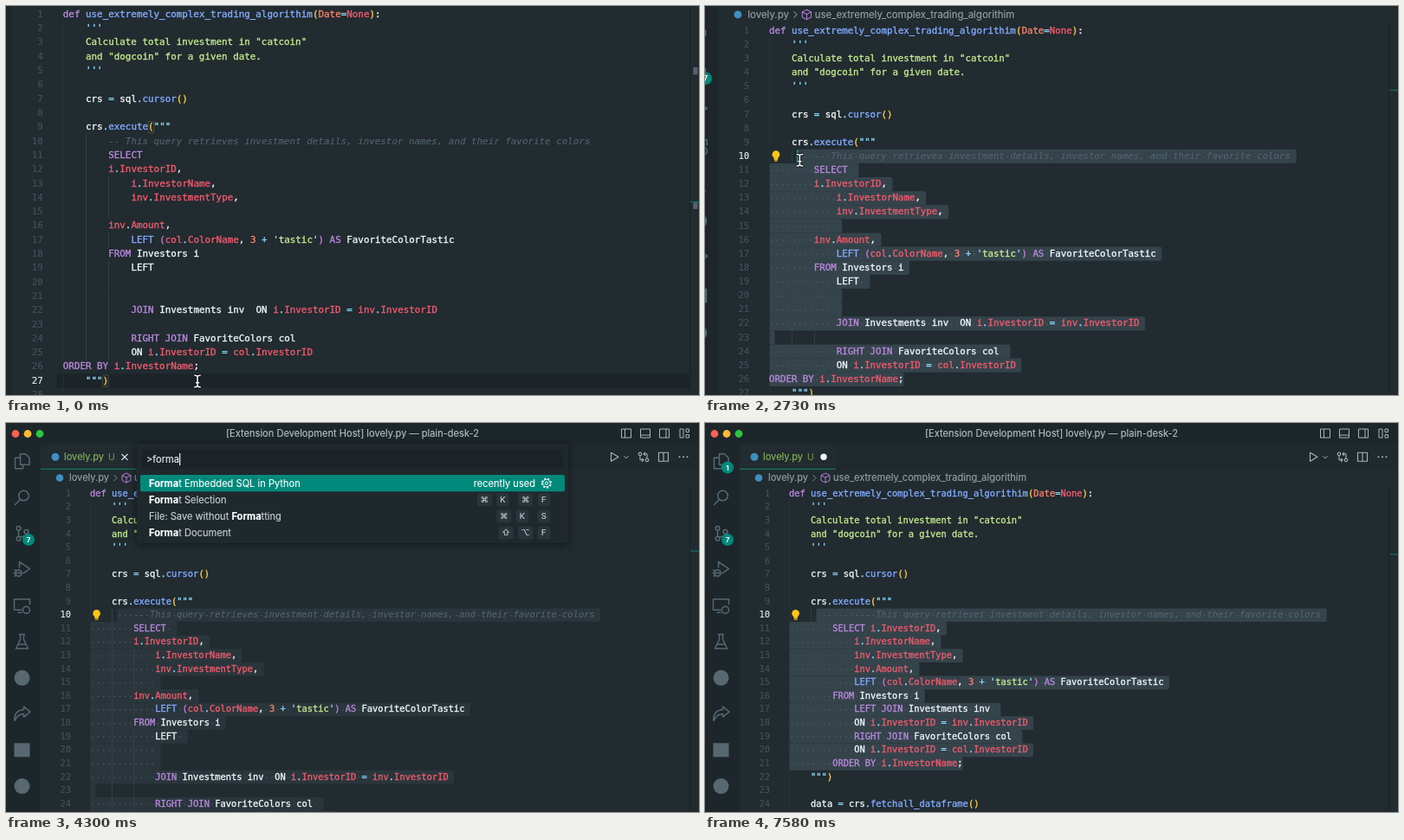
Write an HTML page with a canvas that moves like this. It is 800 by 450 pixels and loops after 7.61 s.

```html
<!DOCTYPE html>
<html lang="en">
<head>
<meta charset="utf-8">
<title>Formatting embedded SQL</title>
<style>
html, body { margin: 0; width: 100%; height: 100%; overflow: hidden; background: #212b30; }
canvas { display: block; width: 800px; height: 450px; }
</style>
</head>
<body>
<canvas id="stage" width="800" height="450"></canvas>
<script>
const ctx = document.getElementById('stage').getContext('2d');
const LOOP = 7610;
const X0 = 97, Y1 = 81.7, CW = 6.27, LH = 15.61;
const MONO = '10.415px "DejaVu Sans Mono", monospace';
const UI = 'Inter, "DejaVu Sans", sans-serif', UI_SIZE = 11.1;
const BG = '#212b30', DARK = '#1d262b', TEAL = '#00897b', ICON = '#586870';
const CLICK = 420, OPEN = 2780, HIDE = 3560, CLOSE = 6730, FORMAT = 6800;
const QUERY = 'format embedded sql';

// ---- code ----
const head = `def use_extremely_complex_trading_algorithim(Date=None):
    '''
    Calculate total investment in "catcoin"
    and "dogcoin" for a given date.
    '''

    crs = sql.cursor()

    crs.execute("""`.split('\n');
const pad = (n, s = '') => ' '.repeat(n) + s;
const comment = '-- This query retrieves investment details, investor names, and their favorite colors';
const left = "LEFT (col.ColorName, 3 + 'tastic') AS FavoriteColorTastic";
const tail = [pad(4, '""")'), '', pad(4, 'data = crs.fetchall_dataframe()')];
const before = [...head,
  pad(8, comment), pad(8, 'SELECT '), pad(8, 'i.InvestorID,'),
  pad(12, 'i.InvestorName,'), pad(12, 'inv.InvestmentType,'), pad(12),
  pad(8, 'inv.Amount,'), pad(12, left), pad(8, 'FROM Investors i'),
  pad(12, 'LEFT '), pad(12), pad(12),
  pad(12, 'JOIN Investments inv  ON i.InvestorID = inv.InvestorID'), '',
  pad(12, 'RIGHT JOIN FavoriteColors col '), pad(12, 'ON i.InvestorID = col.InvestorID'),
  'ORDER BY i.InvestorName;', ...tail];
const after = [...head,
  pad(13, comment), pad(8, 'SELECT i.InvestorID,'),
  pad(12, 'i.InvestorName,'), pad(12, 'inv.InvestmentType,'), pad(12, 'inv.Amount,'),
  pad(12, left), pad(8, 'FROM Investors i'),
  pad(12, 'LEFT JOIN Investments inv '), pad(12, 'ON i.InvestorID = inv.InvestorID'),
  pad(12, 'RIGHT JOIN FavoriteColors col '), pad(12, 'ON i.InvestorID = col.InvestorID'),
  pad(8, 'ORDER BY i.InvestorName;'), ...tail];

const COMMENT = '#53656e';
const rules = [
  [/^ {4}(Calc|and ).*/y, '#c3e88d'],
  [/ +/y, null],
  [/--.*/y, COMMENT],
  [/'+|"+|[.=+]/y, '#89ddff'],
  [/tastic/y, '#c3e88d'],
  [/LEFT(?= \()|(?!def)\w+(?=\()/y, '#82aaff'],
  [/(def|SELECT|AS|FROM|(LEFT |RIGHT )?JOIN|ORDER BY)\b/y, '#b888dc'],
  [/(i|inv|col)(?=\.)|(?<=\.)\w+|None/y, '#f05a6c'],
  [/Date|\d/y, '#f7806c'],
  [/(?<=LEFT )\(|(?<=')\)/y, '#c47ad6'],
  [/[()]/y, '#ffcb3d'],
  [/\w+|./y, '#eef6f7']
];
function tokenize(line) {
  const out = [];
  for (let i = 0; i < line.length;) {
    for (const [re, color] of rules) {
      re.lastIndex = i;
      const m = re.exec(line);
      if (!m) continue;
      if (color) out.push({ col: i, text: m[0], color });
      i += m[0].length;
      break;
    }
  }
  return out;
}
const docs = [before, after].map(lines => ({ lines, tokens: lines.map(tokenize) }));

// ---- commands: label | chords ----
const commands = `Zub: Toggle Zub Mode
Format Embedded SQL in Python
Developer: Toggle Developer Tools|⌥ ⌘ I
Terminal: Create New Terminal (In Active Workspace)
Terminal: Kill All Terminals
Developer: Open Webview Developer Tools
Developer: Reload Window|⌘ R
References: Find All Implementations
Preferences: Open Keyboard Shortcuts|⌘ K,⌘ S
Go to Next Problem (Error, Warning, Info)|⌥ F8
Extensions: Enable All Extensions
Preferences: Color Theme|⌘ K,⌘ T
Extensions: Disable All Installed Extensions
Format Selection|⌘ K,⌘ F
Collapse Folders in Explorer
Help: Privacy Statement
File: Reveal in Drawer|⌥ ⌘ R
File: Save without Formatting|⌘ K,S
Unfold All|⌘ K,⌘ J
Help: Keyboard Shortcuts Reference|⌘ K,⌘ R
ClauseShift: Compare Text with Previous Selection
ClauseShift: Select Text for Compare
Search: Find in Files|⇧ ⌘ F
Preferences: Open User Settings (JSON)
Go to References|⇧ F12
Format Document|⇧ ⌥ F
Preferences: Open User Settings`.split('\n').map(row => {
  const [label, keys = ''] = row.split('|');
  return { label, chords: keys ? keys.split(',').map(c => c.split(' ')) : [] };
});

// ---- helpers ----
const clamp = (v, a, b) => Math.min(b, Math.max(a, v));
const ease = u => (u = clamp(u, 0, 1), u * u * (3 - 2 * u));
const lineY = n => Y1 + (n - 1) * LH;
const colX = c => X0 + c * CW;

function box(x, y, w, h, fill, r = 0) {
  ctx.fillStyle = fill;
  ctx.beginPath();
  ctx.roundRect(x, y, w, h, r);
  ctx.fill();
}
function dot(x, y, r, fill) {
  ctx.fillStyle = fill;
  ctx.beginPath();
  ctx.arc(x, y, r, 0, 7);
  ctx.fill();
}
// A hairline stroke gives the glyphs a slightly heavier stem.
function text(s, x, y, color, font, align = 'left', stem = 0.15) {
  ctx.font = font;
  ctx.fillStyle = ctx.strokeStyle = color;
  ctx.lineWidth = stem;
  ctx.textAlign = align;
  ctx.fillText(s, x, y + 0.3);
  ctx.strokeText(s, x, y + 0.3);
}
const label = (s, x, y, color, align, size = UI_SIZE, weight = 400) =>
  text(s, x, y + 0.3, color, `${weight} ${size}px ${UI}`, align);
function icon(d, x, y, color = ICON, width = 1.3) {
  ctx.save();
  ctx.translate(x, y);
  ctx.strokeStyle = color;
  ctx.lineWidth = width;
  ctx.stroke(new Path2D(d));
  ctx.restore();
}
const ring = (x, y, r) => `M${x - r} ${y}a${r} ${r} 0 1 0 ${2 * r} 0a${r} ${r} 0 1 0 ${-2 * r} 0`;

// ---- timeline ----
const path = [[0, 245.6, 488], [150, 245.6, 488], [400, 249, 471], [600, 250, 456],
  [850, 250.4, 453.4], [1900, 131.2, 226.5]];
function mouse(t) {
  let i = 1;
  while (i < path.length - 1 && t > path[i][0]) i++;
  const [t0, x0, y0] = path[i - 1], [t1, x1, y1] = path[i];
  const u = ease((t - t0) / (t1 - t0));
  return { x: x0 + (x1 - x0) * u, y: y0 + (y1 - y0) * u };
}
function caretAt(t) {
  const m = mouse(Math.max(t - 40, 400));
  const ln = clamp(Math.round((m.y - Y1) / LH) + 1, 10, 26);
  return { ln, col: clamp(Math.round((m.x - X0) / CW), 0, before[ln - 1].length) };
}
// The caret glides: its place is the mean of its recent targets.
function glide(t) {
  let x = 0, y = 0;
  const n = 28;
  for (let i = 0; i < n; i++) {
    const c = caretAt(t - i * 5);
    x += colX(c.col) / n;
    y += lineY(c.ln) / n;
  }
  return { x, y };
}
const keyTime = k => k < 1 ? 3580 : k < 13 ? 3810 + (k - 1) * 130 : 5350 + (k - 13) * 108;

// ---- editor ----
function selection(lines, a, b, focused) {
  const fill = focused ? '#35434b' : '#2a363c';
  for (let n = a.ln; n <= b.ln; n++) {
    const s = lines[n - 1];
    const from = n === a.ln ? a.col : 0, to = n === b.ln ? b.col : s.length;
    const w = (to - from + (n === b.ln ? 0 : 1)) * CW;
    if (w <= 0) continue;
    box(colX(from), lineY(n) - LH / 2, w, LH + 0.1, fill, 2);
    for (let c = from; c < to; c++) {
      if (s[c] === ' ') box(colX(c + 0.5) - 0.6, lineY(n) - 0.1, 1.2, 1.2, '#52636b');
    }
  }
}
function bulb(y) {
  const x = 104.6;
  dot(x, y - 2, 4.3, '#ffc414');
  box(x - 2.2, y + 1, 4.4, 3, '#ffc414');
  box(x - 2, y + 4.3, 4, 1.6, '#c99a14', 0.6);
}
function editor(t) {
  const formatted = t >= FORMAT;
  const { lines, tokens } = docs[+formatted];
  const picking = t < CLICK;
  const palette = t >= OPEN && t < CLOSE;
  const caret = caretAt(t);
  const active = picking ? 27 : caret.ln;

  if (picking) {
    box(90, lineY(27) - LH / 2, 700, LH, '#1c2429');
    for (const [n, c] of [[9, 15], [27, 7]]) {
      ctx.strokeStyle = '#4b5546';
      ctx.lineWidth = 0.8;
      ctx.strokeRect(colX(c), lineY(n) - 6.5, CW, 13);
    }
  } else {
    selection(lines, caret, formatted ? { ln: 21, col: 32 } : { ln: 26, col: 24 }, !palette);
  }

  lines.forEach((s, i) => {
    const y = lineY(i + 1);
    const indent = (s || lines[i + 1]).search(/\S|$/);
    for (let c = 0; c < Math.min(indent, 12); c += 4) {
      box(colX(c), y - LH / 2, 0.8, LH, c ? '#38454c' : '#2a363c');
    }
    text(i + 1, 75, y, i + 1 === active ? '#e4ebed' : '#43525a', MONO, 'right');
    for (const k of tokens[i]) {
      const italic = k.color === COMMENT;
      text(k.text, colX(k.col), y, k.color, (italic ? 'italic ' : '') + MONO, 'left', italic ? 0.1 : 0.35);
    }
  });

  // overview ruler
  box(789.5, 72, 1, 440, '#1a2227');
  if (picking) {
    box(793.5, 140.2, 5, 8, '#56626a');
    box(793.5, 289.2, 5, 8, '#56626a');
  }
  box(790, 73.5 + (active - 1) * (formatted ? 8.7 : 8.3) - 0.7, 10, 1.4, '#17635f');

  if (t > 750 && t < 1250) bulb(lineY(25));
  if (t > 2150) bulb(lineY(10));
  if (!picking && !palette && (t < OPEN || t - CLOSE < 500)) {
    const c = glide(t);
    box(c.x - 0.6, c.y - 7, 1.5, 14, '#12a594');
  }
}

// ---- window frame ----
const bar = [
  'M-2-8.5h6l4.5 4.5v8h-10.500zM-2-4h-6v12.500h9v-4',
  ring(2, -2, 5.8) + 'M-2 2.500L-8.500 9',
  ring(-4, -6, 2.4) + ring(-4, 6, 2.4) + ring(5, -2, 2.4) + 'M-4-3.500V3.500M5 .5c0 3-4 3.500-8 3.500',
  'M-3-2V-9L9-1L1 4.500' + ring(-4, 4, 3.6) + 'M-10 4h3M-9 0l2 1.500M-9 8l2-1.500M-7.500 4h7',
  'M9-1V-7.500H-9V5H0M-5 8H0' + ring(5, 5, 4),
  'M-3.500-8.500h7M-2-8.500v6l-5 10.500h14l-5-10.500v-6M-4.500 3h9',
  null,
  'M2-8.500l7.500 6l-7.500 6v-3.500q-7 0-10.500 8q-1-12 10.500-13z',
  null,
  null
];
function badge(n, y) {
  dot(26, y, 7, TEAL);
  label(n, 26, y, '#fff', 'center', 8, 600);
}
function frame(t) {
  const dirty = t >= FORMAT;
  box(0, 0, 800, 25, DARK);
  box(0, 25, 40, 490, DARK);
  box(40, 25, 760, 28, '#1f292e');
  ['#ff5f57', '#febc2e', '#28c840'].forEach((c, i) => dot(11 + 14 * i, 12.5, 4.4, c));
  label('[Extension Development Host] lovely.py — plain-desk-2', 400, 12.5, '#b4bec2', 'center');

  // layout buttons
  const light = '#aab5ba';
  ['M-1.500-5V5', 'M-5.500 2h11', 'M2-5V5'].forEach((d, i) =>
    icon('M-5.500-5h11v10h-11z' + d, 716 + 22 * i, 12, light, 1));
  icon('M-5-5h4v10h-4zM2-5h3.500v3.500h-3.500zM2 1.500h3.500v3.500h-3.500z', 783, 12, light, 1);

  // tab and its actions
  box(40, 25, 111, 28, BG);
  box(40, 52.8, 111, 1, '#128a72');
  dot(57, 39.3, 4.5, '#3f8fc0');
  label('lovely.py', 67, 39.3, '#86b35a');
  label('U', 118, 39.3, '#6d9448', 'left', 10.5);
  if (dirty) dot(137, 39.3, 3.7, '#f4f7f8');
  else icon('M-3.500-3.500l7 7M3.500-3.500l-7 7', 137, 39.3, '#e8eef0', 1.2);
  icon('M-3.500-5L5 0L-3.500 5z', 702, 39.3, light, 1.1);
  icon('M-2.500-1L0 1.500L2.500-1', 716, 39.3, light, 1);
  icon(ring(-4, -3.5, 1.8) + ring(4, 3.5, 1.8) + 'M-4-1.500V3.500h4M-2 1.500l2 2l-2 2M4 1.500V-3.500H0M2-5.500l-2 2l2 2', 736, 39.3, light, 1.1);
  icon('M-5.500-5h11v10h-11zM0-5V5', 759, 39.3, light, 1.1);
  for (const x of [777.5, 782, 786.5]) dot(x, 39.3, 1, light);

  // breadcrumbs
  dot(62, 63.5, 4.3, '#3f8fc0');
  label('lovely.py', 73, 63.5, '#93a0a6');
  icon('M-1.500-3.500L2 0L-1.500 3.500', 126, 63.5, '#7c8a91', 1);
  icon('M0-5.500L5-3V3L0 5.500L-5 3V-3zM-5-3L0-.5L5-3M0-.5V5.500', 139, 63.5, '#b180d7', 1);
  label('use_extremely_complex_trading_algorithim', 148, 63.5, '#93a0a6');

  // activity bar
  bar.forEach((d, i) => {
    const y = 44.3 + 41.75 * i;
    if (d) icon(d, 18.5, y, ICON, 1.5);
    else if (i === 8) box(9.5, y - 8, 18, 16, ICON);
    else dot(18.5, y, 9, ICON);
  });
  badge(7, 135);
  if (dirty) badge(1, 51.5);
}

// ---- command palette ----
function keycaps(chords, y) {
  let x = 628;
  [...chords].reverse().forEach((chord, i) => {
    if (i) x -= 5;
    [...chord].reverse().forEach(k => {
      const w = /[⌘⌥⇧]/.test(k) ? 17 : 8 + 6.3 * k.length;
      box(x - w, y - 7.5, w, 15, '#2a343a', 2.5);
      label(k, x - w / 2, y, '#c6d0d4', 'center', 9.6);
      x -= w + 5.5;
    });
  });
}
function rowLabel(s, query, y, color) {
  let at = query ? s.search(new RegExp('\\b' + query, 'i')) : 0;
  if (at < 0) at = s.toLowerCase().indexOf(query);
  const end = at + query.length;
  let x = 165;
  [[s.slice(0, at), 400], [s.slice(at, end), 700], [s.slice(end), 400]].forEach(([part, weight]) => {
    label(part, x, y, weight > 400 ? '#fff' : color, 'left', UI_SIZE, weight);
    x += ctx.measureText(part).width;
  });
}
function palette(t) {
  let n = 0;
  while (n < QUERY.length && t >= keyTime(n)) n++;
  const query = QUERY.slice(0, n);
  const rows = commands.filter(c => c.label.toLowerCase().includes(query)).slice(0, 18);
  const step = 19.12;

  ctx.save();
  ctx.shadowColor = 'rgba(0,0,0,.5)';
  ctx.shadowBlur = 8;
  ctx.shadowOffsetY = 1;
  box(151, 24, 498, 38.5 + rows.length * step, '#1f282d', 4);
  ctx.restore();
  box(157, 31, 486, 22, '#1b2328', 2);
  label('>' + query, 162, 42, '#e6edef');
  const caretX = 162 + ctx.measureText('>' + query).width;
  const since = t - (n ? keyTime(n - 1) : OPEN);
  if (since % 1000 < 500) box(caretX, 35, 1.2, 14, '#f2f6f7');

  rows.forEach((row, i) => {
    const y = 69.6 + step * i;
    if (!i) {
      box(155, y - step / 2, 490, step, TEAL, 2);
      label('recently used', 611, y, '#f4fbfa', 'right');
      icon(ring(0, 0, 4.3) + ring(0, 0, 1.6), 624, y, '#f4fbfa', 1);
      ctx.setLineDash([1.9, 2.3]);
      icon(ring(0, 0, 5.3), 624, y, '#f4fbfa', 1.5);
      ctx.setLineDash([]);
    }
    rowLabel(row.label, query, y, i ? '#c5ced2' : '#f4fbfa');
    keycaps(row.chords, y);
  });
}

function pointer(t) {
  const { x, y } = mouse(t);
  const d = 'M-3.500-6.500Q-.5-6.500 0-5Q.5-6.500 3.500-6.500M0-5V5M-3.500 6.500Q-.5 6.500 0 5Q.5 6.500 3.500 6.500M-2 1.500H2';
  icon(d, x, y, '#0b0f11', 3.4);
  icon(d, x, y, '#f4f6f7', 1.5);
}

function draw(t) {
  const zoom = 1 - ease((t - 2330) / 1190);
  const s = 1 + 0.0445 * zoom;
  ctx.setTransform(1, 0, 0, 1, 0, 0);
  box(0, 0, 800, 450, BG);
  ctx.setTransform(s, 0, 0, s, -35.5 * zoom, -75.6 * zoom);
  ctx.textBaseline = 'middle';
  ctx.lineJoin = 'round';
  editor(t);
  frame(t);
  if (t >= OPEN && t < CLOSE) palette(t);
  if (t < HIDE) pointer(t);
}

const start = performance.now();
function tick() {
  draw((performance.now() - start) % LOOP);
  requestAnimationFrame(tick);
}
tick();
</script>
</body>
</html>
```
